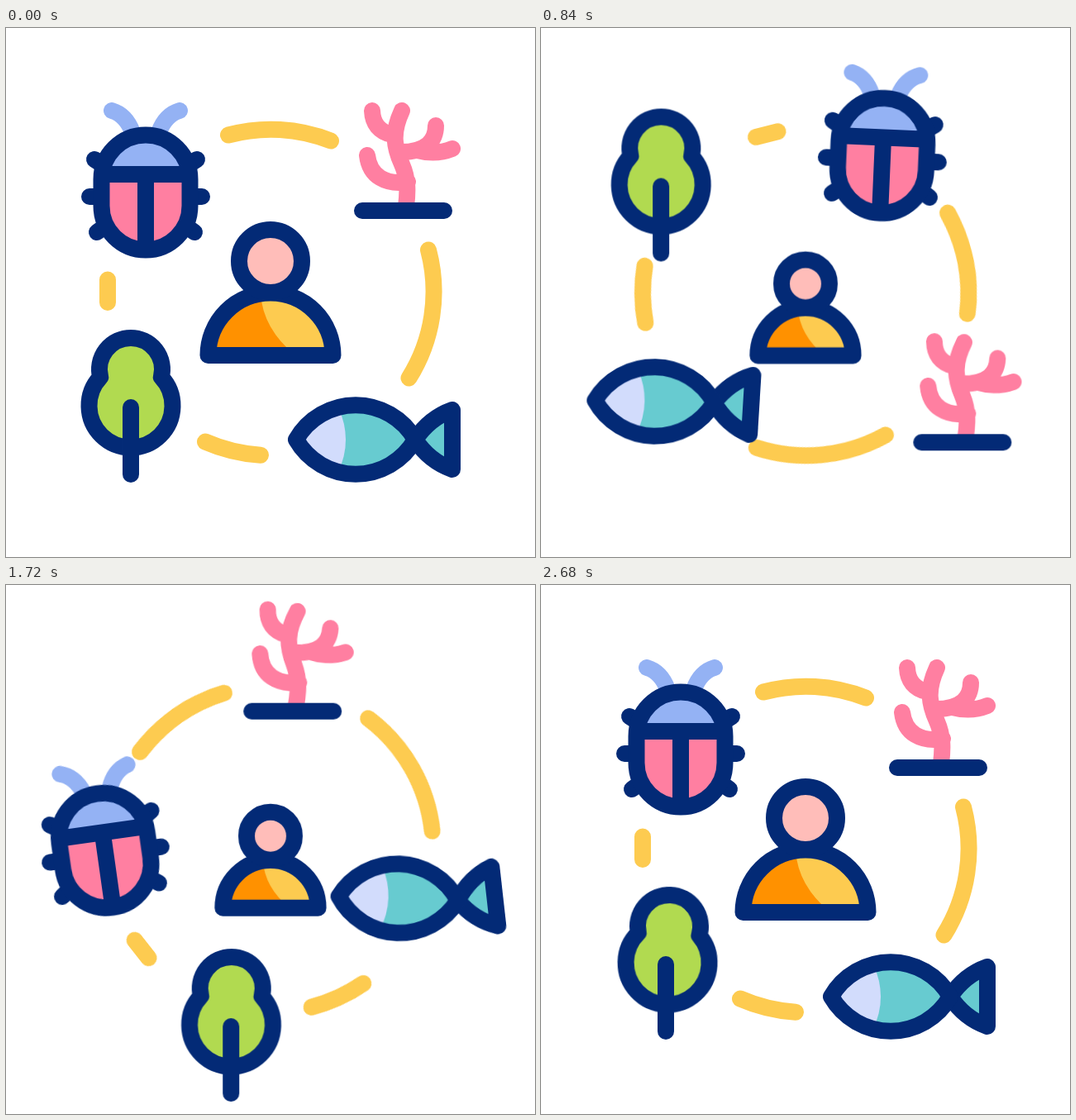
Recreate the animation shown at these times as an HTML page without scripts. Size 640 px wide and 640 px high, loop 3 s.

```html
<!DOCTYPE html>
<html lang="en">
<head>
<meta charset="utf-8">
<title>Ecosystem cycle</title>
<style>
  html, body { margin: 0; width: 100%; height: 100%; overflow: hidden; background: #fff; }
  svg { display: block; width: 640px; height: 640px; }

  .line { fill: none; stroke: #032a76; stroke-width: 20; stroke-linecap: round; stroke-linejoin: round; }
  .arcs { stroke: #fdcb50; }
  .pink { stroke: #ff7fa1; }
  .blue { stroke: #94b2f4; }
  .person * { vector-effect: non-scaling-stroke; }

  g { animation: 3s ease-in-out infinite; }

  /* The ring turns once; every item turns back about its own centre. */
  .spin { animation-name: spin; transform-origin: 320px 320px; }
  .upright { animation-name: upright; }
  .bug, .tilt { transform-origin: 169px 185px; }
  .coral { transform-origin: 485.5px 161px; }
  .fish { transform-origin: 445.5px 498px; }
  .tree { transform-origin: 151px 457.5px; }
  @keyframes spin {
    0% { transform: rotate(0); animation-timing-function: cubic-bezier(.57, 0, .305, 1); }
    84.2%, 100% { transform: rotate(360deg); }
  }
  @keyframes upright {
    0% { transform: rotate(0); animation-timing-function: cubic-bezier(.57, 0, .305, 1); }
    84.2%, 100% { transform: rotate(-360deg); }
  }

  .tilt { animation-name: tilt; }
  @keyframes tilt {
    0% { transform: rotate(0); }
    21.33% { transform: rotate(5deg); }
    34.67%, 46.67% { transform: rotate(0); }
    60% { transform: rotate(-8.7deg); }
    68% { transform: rotate(-7.2deg); }
    89.33%, 100% { transform: rotate(0); }
  }

  .sway { animation-name: sway; transform-origin: 481px 221px; }
  @keyframes sway {
    0% { transform: rotate(0); }
    21.33% { transform: rotate(8deg); }
    34.67% { transform: rotate(-4.5deg); }
    46.67% { transform: rotate(-1.7deg); }
    57.33% { transform: rotate(3.5deg); }
    68% { transform: rotate(1.4deg); }
    89.33%, 100% { transform: rotate(0); }
  }

  .rustle { animation-name: rustle; transform-origin: 151px 505px; }
  @keyframes rustle {
    0% { transform: rotate(0); }
    21.33% { transform: rotate(-2.8deg); }
    34.67% { transform: rotate(3deg); }
    46.67% { transform: rotate(-2.8deg); }
    57.33% { transform: rotate(.3deg); }
    68%, 100% { transform: rotate(2.5deg); }
  }

  .drift { animation-name: drift; }
  @keyframes drift {
    0% { transform: translate(0, 0); }
    18% { transform: translate(-34px, 34px); animation-timing-function: ease-in; }
    21.33% { transform: translate(-34px, 29.5px); animation-timing-function: linear; }
    34.67% { transform: translate(-40px, -10px); animation-timing-function: linear; }
    46.67% { transform: translate(-30px, -20px); animation-timing-function: linear; }
    57.33% { transform: translate(-23px, -22px); animation-timing-function: linear; }
    68% { transform: translate(-6px, -5px); animation-timing-function: ease-out; }
    82%, 100% { transform: translate(0, 0); }
  }
  .swim { animation-name: swim; transform-origin: 423px 498px; }
  @keyframes swim {
    0% { transform: rotate(0); }
    21.33% { transform: rotate(2.6deg); }
    34.67% { transform: rotate(-.5deg); }
    46.67% { transform: rotate(3.5deg); }
    57.33% { transform: rotate(2deg); }
    68%, 100% { transform: rotate(0); }
  }
  .wag { animation-name: wag; transform-origin: 495px 498px; }
  @keyframes wag {
    0% { transform: rotate(0); }
    21.33% { transform: rotate(-7.3deg); }
    34.67% { transform: rotate(12deg); }
    46.67% { transform: rotate(-14.5deg); }
    57.33% { transform: rotate(-8.4deg); }
    68%, 100% { transform: rotate(0); }
  }

  .bob { animation-name: bob; }
  @keyframes bob {
    0% { transform: translateY(0); }
    21.33% { transform: translateY(24px); animation-timing-function: ease-in; }
    34.67% { transform: translateY(6px); animation-timing-function: ease-out; }
    45% { transform: translateY(-12.5px); animation-timing-function: ease-in; }
    57.33% { transform: translateY(12.5px); animation-timing-function: ease-out; }
    67% { transform: translateY(24.2px); }
    84%, 100% { transform: translateY(0); }
  }
  .person { animation-name: shrink; transform-origin: 320px 320px; }
  @keyframes shrink {
    0% { transform: scale(1); }
    18%, 57.33% { transform: scale(.763); }
    72.5%, 100% { transform: scale(1); }
  }
</style>
</head>
<body>
<svg viewBox="0 0 640 640">
  <g class="bob">
    <g class="person">
      <path fill="#fdcb50" d="M244.5 396A75.5 75.5 0 0 1 395.5 396z"/>
      <path fill="#ff9100" d="M244.5 396A75.5 75.5 0 0 1 308 321.5Q311 364 350 396z"/>
      <path class="line" d="M244.5 396A75.5 75.5 0 0 1 395.5 396z"/>
      <circle class="line" cx="320" cy="282" r="38" style="fill:#ffbdb9"/>
    </g>
  </g>

  <g class="spin">
    <path class="line arcs" d="M269 129.5A197 197 0 0 1 393 136.5M511 268.5A197 197 0 0 1 487.500 423.500M308 516.700A197 197 0 0 1 241 500.500M123 332V304.500"/>

    <g class="upright bug">
      <g class="tilt">
        <path class="line blue" d="M128 100Q145 105 153 126M210 100Q193 105 185 126"/>
        <path class="line" d="M107 159l14 9M101 204h14M110 247l11-8M231 159l-14 9M237 204h-14M228 247l-11-8"/>
        <path fill="#ff7fa1" d="M115.500 177h107v38a53.500 53.500 0 0 1-107 0z"/>
        <path fill="#94b2f4" d="M115.500 177v6a53.500 53.500 0 0 1 107 0v-6z"/>
        <path fill="#94b2f4" d="M115.500 183a53.500 53.500 0 0 1 107 0l-1-6h-105z"/>
        <path class="line" d="M115.500 183a53.500 53.500 0 0 1 107 0v32a53.500 53.500 0 0 1-107 0zM118 177h102M169 177v90"/>
      </g>
    </g>

    <g class="upright coral">
      <g class="sway">
        <path class="line pink" d="M479 100C466 128 470 145 479 165C487 183 486 200 484 216M443 100Q444 124 467 129M520 118C520 136 509 150 478 150M540 146Q520 154 498 148M437 154C440 180 460 190 486 186"/>
      </g>
      <path class="line" d="M431 221H530"/>
    </g>

    <g class="drift">
      <g class="upright fish">
        <g class="swim">
          <g class="wag">
            <path class="line" style="fill:#67cbd0" d="M495 498Q512 472 540 462V534Q512 524 495 498z"/>
          </g>
          <path fill="#67cbd0" d="M351 498A83 83 0 0 1 495 498A83 83 0 0 1 351 498z"/>
          <path fill="#d2dcfc" d="M351 498A83 83 0 0 1 402 459Q420 498 402 537A83 83 0 0 1 351 498z"/>
          <path class="line" d="M351 498A83 83 0 0 1 495 498A83 83 0 0 1 351 498z"/>
        </g>
      </g>
    </g>

    <g class="upright tree">
      <g class="rustle">
        <path class="line" style="fill:#b1da50" d="M114.200 422.400A38 38 0 1 1 187.800 422.400A50.500 50.500 0 1 1 114.200 422.400z"/>
      </g>
      <path class="line" d="M151 459V540"/>
    </g>
  </g>
</svg>
</body>
</html>
```
